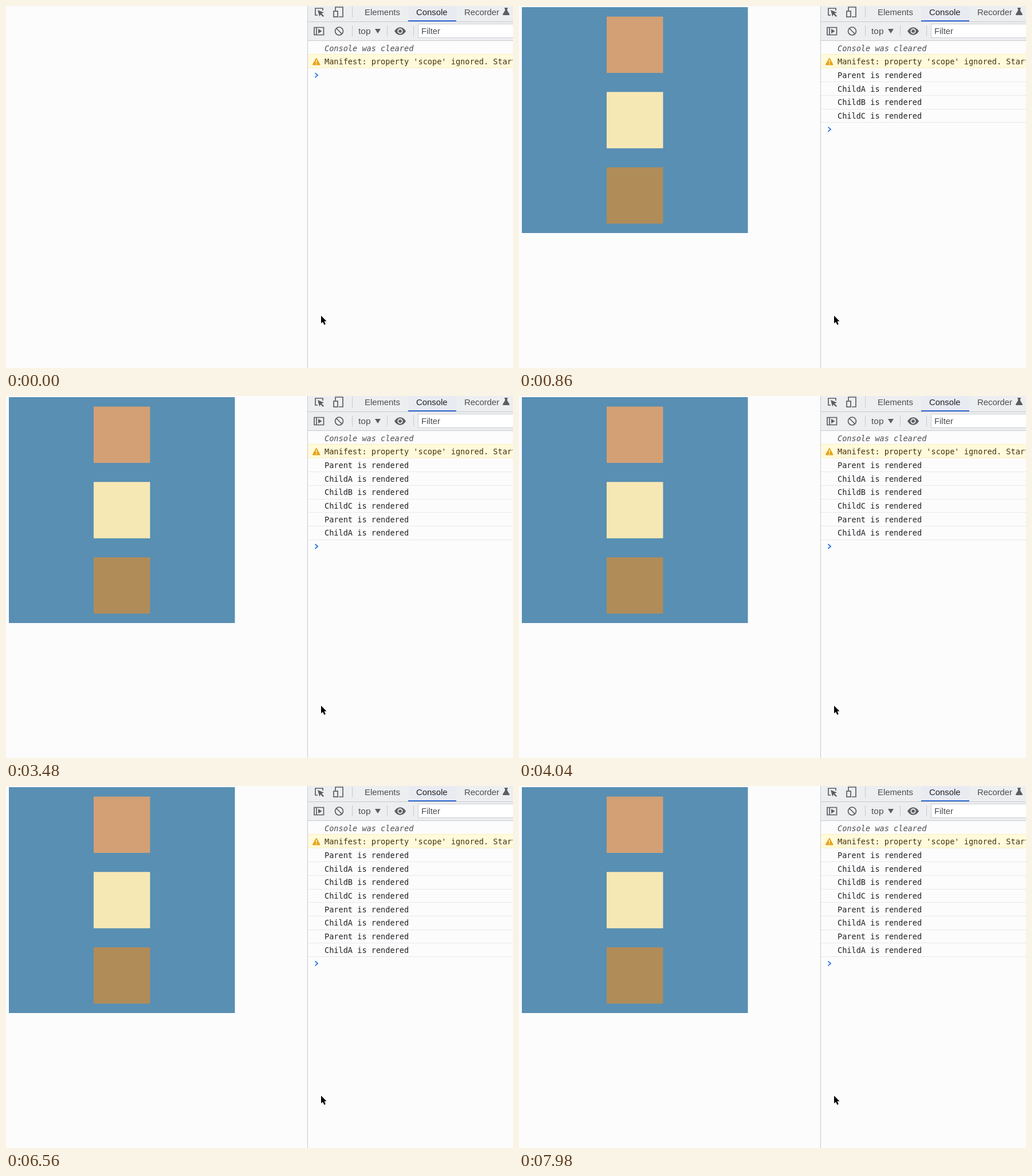
An HTML page for the animation above (8000 ms loop, 885 px wide and 633 px high).

```html
<!DOCTYPE html>
<html lang="en">
<head>
<meta charset="utf-8">
<title>Render log</title>
<style>
  html, body { margin: 0; width: 100%; height: 100%; overflow: hidden; background: #fcfcfd; }
  svg { display: block; width: 885px; height: 633px; }
  .ui { font: 14.85px "Liberation Sans", Arial, sans-serif; fill: #4b4e52; }
  .log { font: 13.58px "DejaVu Sans Mono", monospace; fill: #202124; white-space: pre; }
  .line { fill: none; stroke: #5b5e62; stroke-width: 1.7; }
  .rule { stroke: #c6c9cd; }
  .solid { fill: #5b5e62; }
</style>
</head>
<body>
<svg viewBox="0 0 885 633">
  <rect width="885" height="633" fill="#fcfcfd"/>

  <g id="page">
    <rect x="5" y="2" width="394.5" height="395" fill="#588fb3"/>
    <rect x="153" y="18.5" width="98.5" height="98.5" fill="#d3a075"/>
    <rect x="153" y="150.3" width="98.5" height="98.5" fill="#f6e8b5"/>
    <rect x="153" y="282" width="98.5" height="98.5" fill="#b08c59"/>
  </g>

  <rect x="526" width="359" height="60" fill="#edeef0"/>
  <rect x="702" width="84" height="27" fill="#e9ebf3"/>
  <path class="rule" d="M526 27.5H885M526 60.5H885M526.5 0V633M604.5 1V20M604.5 34V53M665.5 34V53M711.5 34V53"/>
  <rect x="702" y="25" width="84" height="2" fill="#2f69d2"/>
  <rect x="719.5" y="31.5" width="170" height="24" fill="#fff" stroke="#cbcdd1"/>

  <g class="ui">
    <text x="626" y="16">Elements</text>
    <text x="716" y="16" fill="#202124">Console</text>
    <text x="800" y="16">Recorder</text>
    <text x="615" y="49" font-size="15.5">top</text>
    <text x="725" y="49.3">Filter</text>
  </g>

  <!-- Toolbar icons -->
  <path class="line" d="M544 16H540V4H553V8"/>
  <path class="solid" d="M544 7L555 11.5 550.8 13 555 17.5 553.3 19 549 14.7 547.2 18.5Z"/>
  <path class="line" d="M575 8V2H588V19H581"/>
  <rect class="line" x="572" y="9" width="7" height="10"/>
  <path class="solid" d="M870 3H876V4.5H875V8L879 14.5Q879 16 878 16H868Q867 16 867 14.5L871 8V4.5H870Z"/>
  <path class="line" d="M538 37.5H554.5V50.5H538ZM542 37V51"/>
  <path class="solid" d="M545 40L551.5 44 545 48Z"/>
  <circle class="line" cx="581.5" cy="44" r="7" stroke-width="2"/>
  <path class="line" d="M576.5 39L586.5 49"/>
  <path class="solid" d="M644 40H654L649 48Z"/>
  <path class="solid" fill-rule="evenodd" d="M678 44Q682 37.3 688 37.3T698 44Q694 50.7 688 50.7T678 44ZM683.3 44A4.7 4.7 0 1 0 692.7 44A4.7 4.7 0 1 0 683.3 44Z"/>
  <circle class="solid" cx="688" cy="44" r="2.8"/>

  <!-- Console -->
  <rect x="527" y="84.5" width="358" height="23.5" fill="#fffadb"/>
  <path d="M527 84.5H885M527 108H885" stroke="#fbf0b5"/>
  <path d="M541.8 92L547.5 102.5H536Z" fill="#e5a51b" stroke="#e5a51b" stroke-width="2" stroke-linejoin="round"/>
  <path d="M541.8 94.5V98.7M541.8 100.2V102" stroke="#fff" stroke-width="1.5"/>
  <text class="log" x="556" y="78.7" font-style="italic" style="font-style:italic;fill:#4b4d50">Console was cleared</text>
  <text class="log" x="556" y="102.3" style="fill:#463308">Manifest: property 'scope' ignored. Start</text>
  <g id="rows"></g>
  <path id="prompt" d="M539.5 -4L544 0 539.5 4" fill="none" stroke="#2f73e0" stroke-width="1.8"/>

  <path d="M550 541.5V555L553.1 552.2 555.4 557.4 557.8 556.3 555.5 551.2H559.5Z" fill="#000" stroke="#fff" stroke-width="1.2" paint-order="stroke"/>
</svg>
<script>
  const LOOP = 8000, ROW = 23.65, FIRST_CENTER = 73.8;
  const renders = [
    { at: 60, names: ["Parent", "ChildA", "ChildB", "ChildC"] },
    { at: 3060, names: ["Parent", "ChildA"] },
    { at: 6060, names: ["Parent", "ChildA"] }
  ];
  const page = document.getElementById("page");
  const rows = document.getElementById("rows");
  const prompt = document.getElementById("prompt");
  const center = index => FIRST_CENTER + ROW * index;

  const entries = renders.flatMap(({ at, names }) => names.map(name => ({ at, name })));
  rows.innerHTML = entries.map(({ name }, i) => {
    const y = center(i + 2);
    const rule = Math.floor(y + ROW / 2) + 0.5;
    return `<g><text class="log" x="556" y="${y + 4.9}">${name} is rendered</text>
      <path d="M527 ${rule}H885" stroke="#e7e8ea"/></g>`;
  }).join("");

  function draw(now) {
    const time = now % LOOP;
    const shown = entries.filter(entry => time >= entry.at).length;
    page.style.display = shown ? "" : "none";
    [...rows.children].forEach((row, i) => row.style.display = i < shown ? "" : "none");
    prompt.setAttribute("transform", `translate(0 ${center(shown + 2)})`);
  }

  const start = performance.now();
  function tick() {
    draw(performance.now() - start);
    requestAnimationFrame(tick);
  }
  tick();
</script>
</body>
</html>
```
